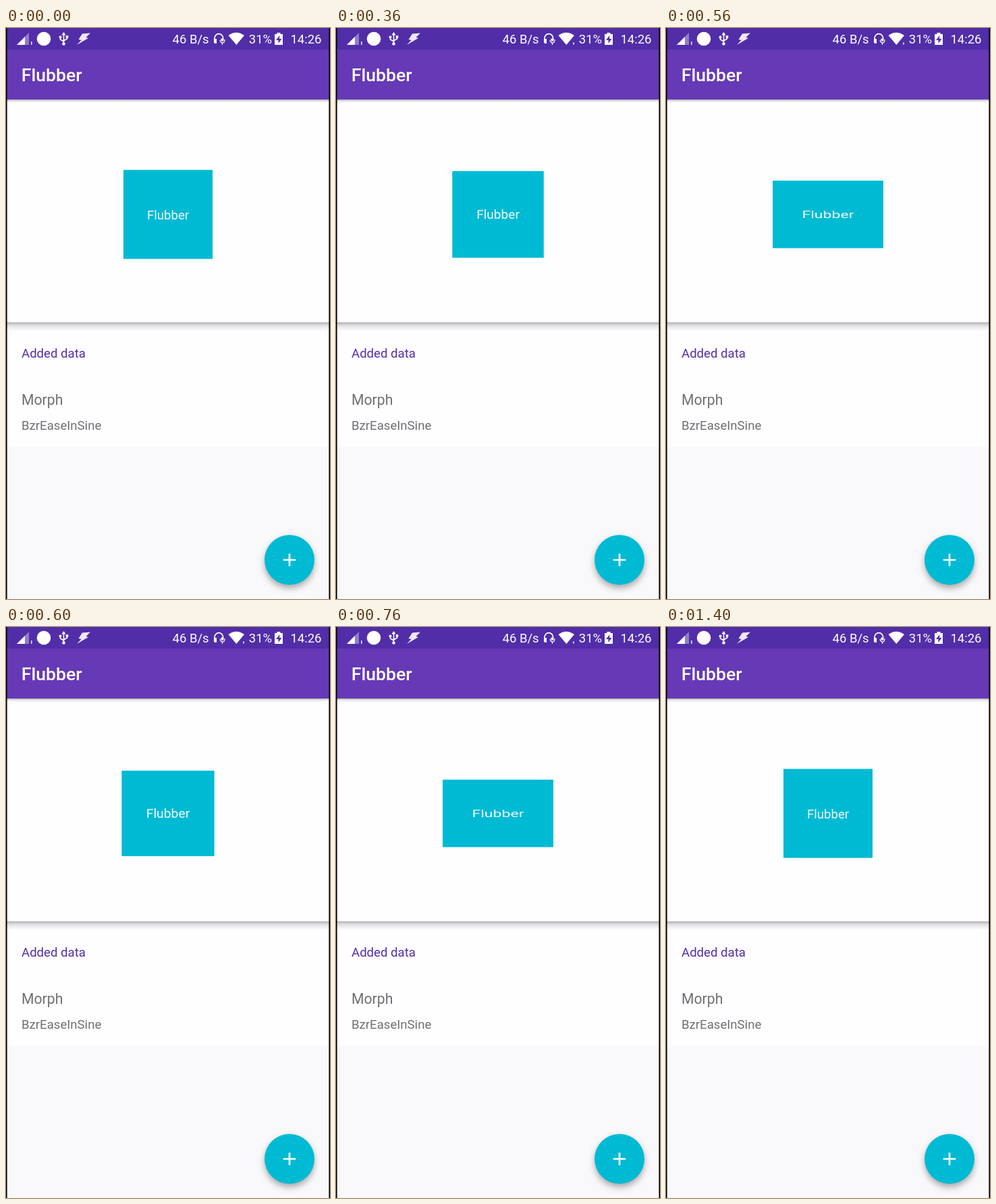
Write an HTML page with a canvas that moves like this. It is 480x847 px and loops after 1.44 s.

```html
<!DOCTYPE html>
<html lang="en">
<head>
<meta charset="utf-8">
<title>Morph</title>
<style>
  html, body { margin: 0; width: 100%; height: 100%; overflow: hidden; }
  canvas { display: block; }
</style>
</head>
<body>
<canvas id="stage" width="480" height="847"></canvas>
<script>
const ctx = document.getElementById('stage').getContext('2d');
const LOOP = 1440, STEP = 40;
const CYAN = '#00bad3', PURPLE = '#512da8', WHITE = '#fff', PAPER = '#fefdff';

function rect(x, y, w, h, color) {
  ctx.fillStyle = color;
  ctx.fillRect(x, y, w, h);
}

function text(str, x, y, size, color, weight = 400, align = 'left') {
  ctx.font = `${weight} ${size}px Roboto, sans-serif`;
  ctx.textAlign = align;
  ctx.fillStyle = color;
  ctx.fillText(str, x, y);
}

function shape(path, color) {
  ctx.fillStyle = color;
  ctx.fill(new Path2D(path));
}

function line(path, color, width) {
  ctx.strokeStyle = color;
  ctx.lineWidth = width;
  ctx.stroke(new Path2D(path));
}

function circle(x, y, r, color) {
  ctx.beginPath();
  ctx.arc(x, y, r, 0, Math.PI * 2);
  ctx.fillStyle = color;
  ctx.fill();
}

function shadowBelow(y, depth, alpha) {
  const fade = ctx.createLinearGradient(0, y, 0, y + depth);
  fade.addColorStop(0, `rgba(0,0,0,${alpha})`);
  fade.addColorStop(0.4, `rgba(0,0,0,${alpha * 0.35})`);
  fade.addColorStop(1, 'rgba(0,0,0,0)');
  rect(0, y, 480, depth, fade);
}

// Linear interpolation through [position, value] pairs
function track(points, at) {
  if (at <= points[0][0]) return points[0][1];
  for (let i = 1; i < points.length; i++) {
    const [x0, y0] = points[i - 1], [x1, y1] = points[i];
    if (at <= x1) return y0 + (y1 - y0) * (at - x0) / (x1 - x0);
  }
  return points[points.length - 1][1];
}

// cubic-bezier(0.47, 0, 0.745, 0.715)
function easeInSine(x) {
  const curve = (s, a, b) => 3 * (1 - s) ** 2 * s * a + 3 * (1 - s) * s * s * b + s ** 3;
  let lo = 0, hi = 1;
  for (let i = 0; i < 24; i++) {
    const mid = (lo + hi) / 2;
    if (curve(mid, 0.47, 0.745) < x) lo = mid; else hi = mid;
  }
  return x >= 1 ? 1 : x <= 0 ? 0 : curve(lo, 0, 0.715);
}

const progress = [[278, 0], [680, 0.692], [760, 0.851], [860, 1]];
const stretch = [[0, 0], [0.25, 0.3], [0.5, -0.3], [0.75, 0.3], [1, 0]];

function statusBar(t) {
  rect(0, 0, 480, 32, PURPLE);
  shape('M16 25L34 7V25Z', 'rgba(255,255,255,.38)');
  shape('M16 25L28 13V25Z', WHITE);
  rect(37, 20, 1.6, 5, '#e4dcf2');
  circle(56, 16, 10.3, WHITE);

  // USB trident
  line('M85.5 9V23M80.5 14V17L85.5 20M90.5 13V16L85.5 19', WHITE, 1.6);
  shape('M85.5 6L88.5 10.5H82.5Z', WHITE);
  circle(85.5, 23.5, 2.3, WHITE);
  circle(80.5, 13.5, 2, WHITE);
  rect(88.7, 11.2, 3.6, 3.6, WHITE);

  shape('M113 8.5L125 7.5L118.5 14L122 15L105 25L111.5 18L107.5 17Z', '#eee8f8');

  text('46 B/s', 246.5, 23, 18.5, WHITE);

  // Headset
  line('M309 18V15A6.3 6.3 0 0 1 321.6 15V16', WHITE, 1.7);
  shape('M308 16H312V23H310Q308 23 308 21Z', WHITE);
  circle(320.5, 17.5, 2.2, WHITE);
  line('M317 18Q318 22 321 22T324 17M320.5 22V25', WHITE, 1.2);

  shape('M329.5 11Q341 2.500 353 11L341.300 25Z', WHITE);
  if (t >= 280 && t < 1400) rect(351, 21.5, 2, 3, '#d8cdeb');

  text('31%', 359.8, 23, 18.5, WHITE);
  shape('M401.500 7H406.500V9H410V25H398V9H401.500Z', WHITE);
  shape('M405.500 11L400 18H403.500V23L408.500 16H405Z', PURPLE);
  text('14:26', 467.5, 23, 18.5, WHITE, 400, 'right');
}

function morphBox(t) {
  const d = track(stretch, easeInSine(track(progress, t)));
  ctx.save();
  ctx.translate(240, 276.5);
  ctx.scale(1 + d, 1 - d);
  rect(-66, -66, 132, 132, CYAN);
  text('Flubber', 0, 7, 18.6, '#f4fcfd', 400, 'center');
  ctx.restore();
}

function addButton() {
  ctx.save();
  ctx.shadowColor = 'rgba(0,0,0,.32)';
  ctx.shadowBlur = 10;
  ctx.shadowOffsetY = 5;
  circle(420, 789, 37, CYAN);
  ctx.restore();
  line('M410.700 789H429.300M420 779.700V798.300', WHITE, 2.7);
}

function draw(t) {
  rect(0, 0, 480, 847, '#f9f8fa');
  rect(0, 106, 480, 515, PAPER);
  shadowBelow(436.5, 13, 0.3);
  rect(0, 32, 480, 74, '#6639b6');
  shadowBelow(106, 5, 0.32);
  statusBar(t);

  text('Flubber', 22.8, 79, 26.6, WHITE, 500);
  morphBox(t);
  text('Added data', 23, 488.5, 18.6, PURPLE);
  text('Morph', 23, 559, 21.2, '#707070');
  text('BzrEaseInSine', 23, 595.5, 18.6, '#707070');
  addButton();

  rect(0, 0, 1.6, 847, '#000');
  rect(478.4, 0, 1.6, 847, '#000');
}

const start = performance.now();
function tick() {
  const t = (performance.now() - start) % LOOP;
  draw(Math.floor(t / STEP) * STEP);
  requestAnimationFrame(tick);
}
tick();
</script>
</body>
</html>
```
